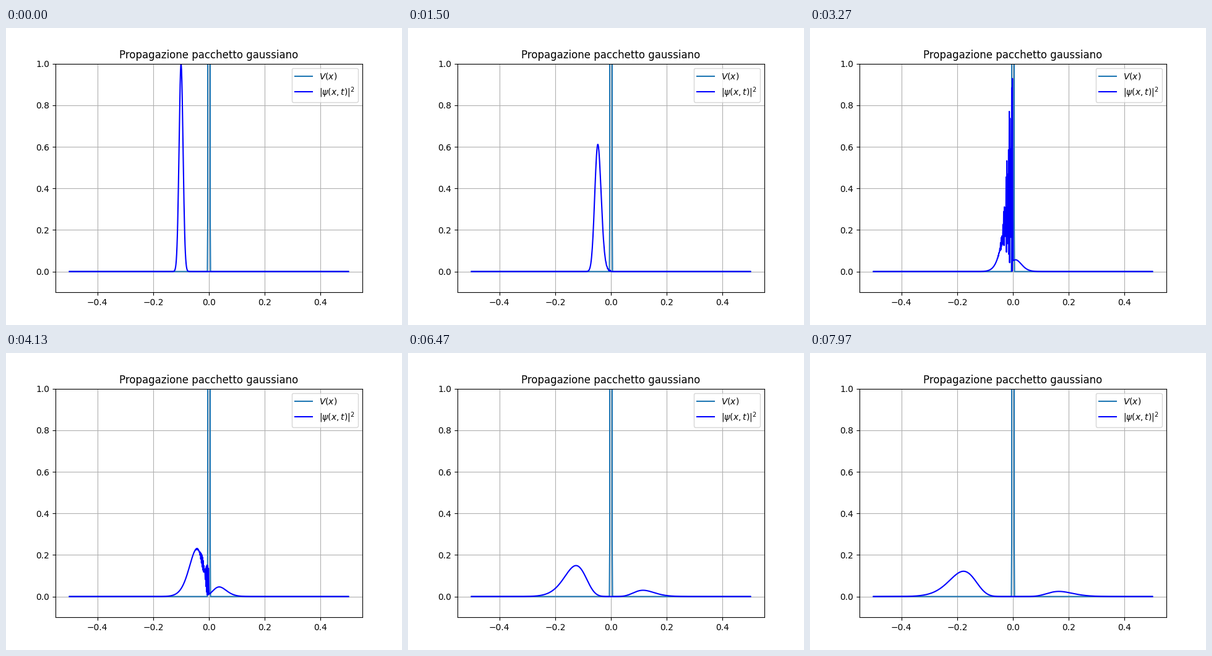
Animation of 640x480 px, one loop 8000 ms. Source, as a matplotlib script:

```python
import numpy as np
import matplotlib.pyplot as plt
from matplotlib.animation import FuncAnimation

FRAMES = 240
FPS = 30

# Grid, barrier and wave packet
N = 800
DT = 1e-5
V0, WIDTH = 8.3e5, 0.0008
X0, SIGMA, K0 = -0.1, 0.01, 1040

x = np.linspace(-0.5, 0.5, N)
dx = x[1] - x[0]
V = V0 * np.exp(-x**2 / (2 * WIDTH**2))


def evolve():
    """Crank-Nicolson evolution; returns |psi|^2 for every frame."""
    hop = np.full(N - 1, -0.5 / dx**2)
    H = np.diag(1 / dx**2 + V) + np.diag(hop, 1) + np.diag(hop, -1)
    eye = np.eye(N)
    step = np.linalg.solve(eye + 0.5j * DT * H, eye - 0.5j * DT * H)

    psi = np.exp(-(x - X0)**2 / (2 * SIGMA**2) + 1j * K0 * x)
    density = np.empty((FRAMES, N))
    for i in range(FRAMES):
        density[i] = np.abs(psi)**2
        psi = step @ psi
    return density


density = evolve()

fig, ax = plt.subplots(figsize=(6.4, 4.8), dpi=100)
ax.set_title("Propagazione pacchetto gaussiano")
ax.set_xlim(-0.55, 0.55)
ax.set_ylim(-0.1, 1.0)
ax.grid(True)
ax.plot(x, V, label=r"$V(x)$")
packet, = ax.plot(x, density[0], color="blue", label=r"$|\psi(x,t)|^2$")
ax.legend(loc="upper right")


def update(i):
    packet.set_ydata(density[i])
    return packet,


anim = FuncAnimation(fig, update, frames=FRAMES, interval=1000 / FPS,
                     repeat=True, repeat_delay=0)
plt.show()
```
